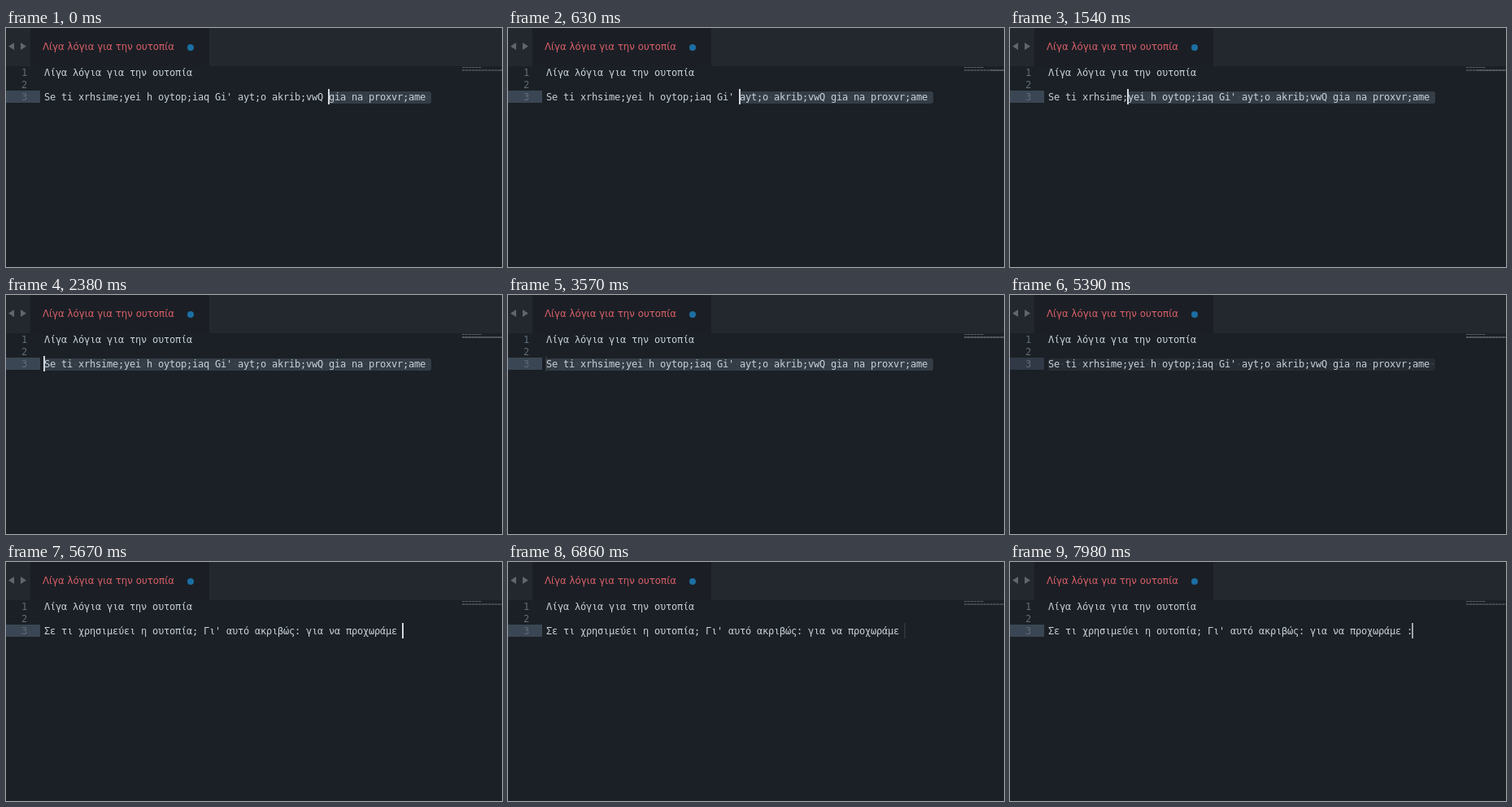
These frames come from a looping animation (610x294 px, 8 s). An HTML page:

```html
<!DOCTYPE html>
<html lang="el">
<head>
<meta charset="utf-8">
<title>Editor</title>
<style>
@property --col { syntax: "<integer>"; inherits: true; initial-value: 50; }

html, body { margin: 0; width: 100%; height: 100%; overflow: hidden; background: #1a2025; }

.stage {
  position: relative; width: 610px; height: 294px; overflow: hidden;
  background: #1a2025; color: #c8d0d9;
  font: 12px/15px "DejaVu Sans Mono", monospace;
  letter-spacing: calc(7px - 1ch);
  white-space: pre;
  font-variant-ligatures: none;
  animation: column 8s step-end infinite;
}
.stage * { position: absolute; }

/* tab bar */
.bar { left: 0; top: 0; width: 610px; height: 47px; background: #23272e; }
.tab { left: 30px; top: 0; width: 220px; height: 47px; background: #1b1f25; }
.title {
  left: 15px; top: 15px; color: #db5f68;
  font: 11.8px/16px "DejaVu Sans", sans-serif; letter-spacing: 0;
}
.dirty { left: 193px; top: 20px; width: 8px; height: 8px; border-radius: 50%; background: #1c6fa3; }
.arrows { left: 0; top: 0; fill: #62666b; }

/* text rows */
.row1 { top: 48px; }
.row2 { top: 63px; }
.row3 { top: 78px; }
.num { left: 19px; color: #626c77; }
.code { left: 47px; }
.gutter { left: 0; top: 77px; width: 42px; height: 15px; background: #3a4653; animation: gutter 8s step-end infinite; }
.before { animation: before 8s step-end infinite; }
.after { animation: after 8s step-end infinite; }
.typed { left: 488px; animation: typed 8s step-end infinite; }

.sel {
  left: calc(47px + 7px * var(--col)); right: 87px; height: 15px;
  border-radius: 3px; overflow: hidden; background: #343d46;
  animation: sel 8s step-end infinite;
}
.dots { right: 0; color: #3f4851; }

.caret {
  left: calc(46px + 7px * var(--col)); top: 75px; width: 2px; height: 19px;
  background: #d3d7dc; animation: blink 8s linear infinite;
}

/* minimap: 0.93px per column */
.map { left: 561px; height: 1px; background: repeating-linear-gradient(90deg, #7d848b 0 3px, #4b5158 3px 4px); opacity: .6; }
.map1 { top: 48px; width: 24px; }
.map3 { top: 51px; width: 49px; height: 2px; opacity: .4; }
.mapsel {
  left: calc(561px + .93px * var(--col)); right: 0; top: 51px; height: 2px;
  background: #7f878e; opacity: .25; animation: before 8s step-end infinite;
}

@keyframes column {
  0% { --col: 50; }
  .875% { --col: 46; }
  3.5% { --col: 40; }
  5.25% { --col: 38; }
  7.875% { --col: 34; }
  10.5% { --col: 30; }
  12.25% { --col: 26; }
  14.875% { --col: 20; }
  17.5% { --col: 18; }
  19.25% { --col: 14; }
  21.875% { --col: 6; }
  24.5% { --col: 3; }
  28% { --col: 0; }
  68.25% { --col: 63; }
  91.875%, 100% { --col: 64; }
}
@keyframes blink {
  0%, 33.5% { opacity: 1; }
  38.5%, 44.2% { opacity: 0; }
  48.5%, 49.5% { opacity: 1; }
  54.25%, 59.9% { opacity: 0; }
  64%, 66.49% { opacity: 1; }
  66.5%, 68.24% { opacity: 0; }
  68.25%, 73.8% { opacity: 1; }
  79%, 85.3% { opacity: 0; }
  90%, 97.3% { opacity: 1; }
  100% { opacity: .7; }
}
@keyframes gutter {
  0%, 68.25%, 100% { background: #3a4653; }
  66.5% { background: #303945; }
}
@keyframes sel {
  0% { background: #343d46; visibility: visible; }
  66.5% { background: #262c33; visibility: visible; }
  68.25%, 100% { background: #262c33; visibility: hidden; }
}
@keyframes before {
  0% { visibility: visible; }
  68.25%, 100% { visibility: hidden; }
}
@keyframes after {
  0% { visibility: hidden; }
  68.25%, 100% { visibility: visible; }
}
@keyframes typed {
  0% { visibility: hidden; }
  91.875%, 100% { visibility: visible; }
}
</style>
</head>
<body>
<div class="stage"><div class="bar"></div><svg class="arrows" width="30" height="47"><path d="M10 18v9l-7-4.500zM18 18v9l7-4.500z"/></svg><div class="tab"><div class="title">Λίγα λόγια για την ουτοπία</div><div class="dirty"></div></div><div class="gutter"></div><div class="num row1">1</div><div class="num row2">2</div><div class="num row3">3</div><div class="sel row3"><div class="dots"></div></div><div class="code row1">Λίγα λόγια για την ουτοπία</div><div class="code row3 before">Se ti xrhsime;yei h oytop;iaq Gi' ayt;o akrib;vwQ gia na proxvr;ame </div><div class="code row3 after">Σε τι χρησιμεύει η ουτοπία; Γι' αυτό ακριβώς: για να προχωράμε </div><div class="row3 typed">:</div><div class="caret"></div><div class="map map1"></div><div class="map map3"></div><div class="mapsel"></div></div>
<script>
// Selected spaces show as faint dots.
const line = document.querySelector(".before").textContent;
document.querySelector(".dots").textContent = line.replace(/./g, c => c === " " ? "·" : " ");
</script>
</body>
</html>
```
